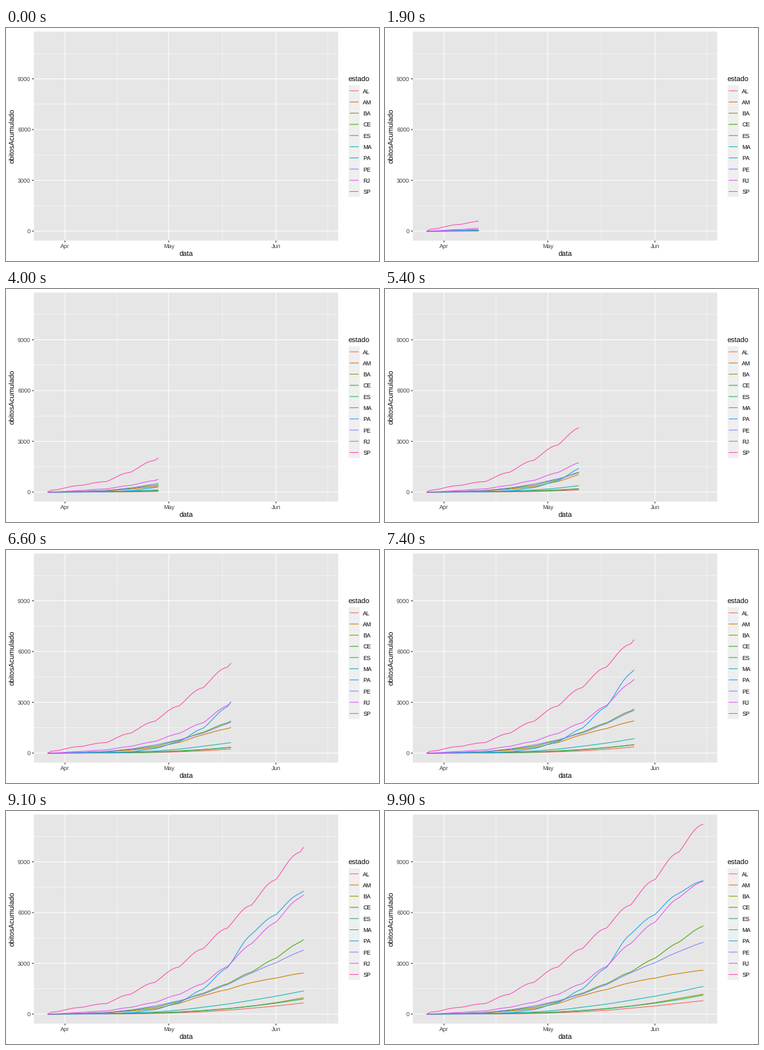
A matplotlib script that plays this animation: 576x360 px, repeating every 10000 ms.

```python
import matplotlib.pyplot as plt
import numpy as np
from matplotlib.animation import FuncAnimation
from matplotlib.patches import Rectangle

W, H, DPI = 576, 360, 72
FRAMES, INTERVAL = 100, 100
DAYS = 80                                  # 27 March to 15 June
LEFT, RIGHT, TOP, BOTTOM = 43.0, 513.0, 5.5, 328.5
Y_MAX = 11231

plt.rcParams.update({
    "font.family": "Liberation Sans",
    "text.hinting": "none",
    "text.hinting_factor": 1,
    "path.simplify": False,
})

# State: colour, weekend lag in days, totals on the key days
KEY_DAYS = [1, 17, 31, 45, 59, 73, 80]
STATES = {
    "AL": ("#f5645b", .1, [1, 4, 36, 140, 350, 640, 796]),
    "AM": ("#cf7a00", .5, [1, 74, 325, 1090, 1860, 2400, 2593]),
    "BA": ("#919300", .1, [1, 23, 78, 215, 480, 930, 1186]),
    "CE": ("#3fa70a", .6, [1, 94, 400, 1230, 2490, 4260, 5213]),
    "ES": ("#1fb56b", .1, [1, 18, 57, 200, 470, 860, 1121]),
    "MA": ("#17b3b7", .1, [1, 30, 125, 410, 820, 1330, 1637]),
    "PA": ("#1a9ff1", .8, [1, 17, 265, 1480, 4735, 7146, 7890]),
    "PE": ("#8a7cfd", .3, [2, 102, 480, 1190, 2440, 3700, 4245]),
    "RJ": ("#de54ef", .8, [6, 191, 688, 1798, 4171, 6890, 7853]),
    "SP": ("#fd4ab0", 1.1, [60, 625, 1880, 3872, 6456, 9585, Y_MAX]),
}


def totals(lag, keys):
    """Power-law growth between key days; counts run ahead until the weekend."""
    day = np.arange(1, DAYS + 1)
    week = (day - 3) % 7 / 7
    ahead = day + lag * np.sin(np.pi * week ** 1.4)
    growth = np.interp(np.log(ahead), np.log(KEY_DAYS), np.log(keys))
    return np.concatenate([[0], np.exp(growth)])


def px(day):
    return LEFT + (RIGHT - LEFT) * (day / DAYS + .05) / 1.1


def py(value):
    return BOTTOM - (BOTTOM - TOP) * (value / Y_MAX + .05) / 1.1


fig = plt.figure(figsize=(W / DPI, H / DPI), dpi=DPI, facecolor="white")
ax = fig.add_axes([0, 0, 1, 1])
ax.set_xlim(0, W)
ax.set_ylim(H, 0)
ax.axis("off")


def box(x, y, w, h, color):
    ax.add_patch(Rectangle((x, y), w, h, fc=color, ec="none", snap=False))


def stroke(xs, ys, color, width=1.07):
    line, = ax.plot(xs, ys, color=color, lw=width, snap=False,
                    solid_capstyle="butt", solid_joinstyle="round")
    return line


def label(x, y, text, size=8.8, color="black", ha="left", **kw):
    ax.text(x, y, text, fontsize=size, color=color, ha=ha, va="baseline", **kw)


# Panel, grid and axes
box(LEFT, TOP, RIGHT - LEFT, BOTTOM - TOP, "#e6e6e6")
for day in (20, 50.5, 81):
    stroke([px(day)] * 2, [TOP, BOTTOM], "white", .53)
for value in range(1500, 12000, 3000):
    stroke([LEFT, RIGHT], [py(value)] * 2, "white", .53)
for day, month in ((5, "Apr"), (35, "May"), (66, "Jun")):
    x = px(day)
    stroke([x, x], [TOP, BOTTOM], "white")
    stroke([x, x], [BOTTOM, BOTTOM + 2.75], "#242424")
    label(x, 340.4, month, color="#3b3b3b", ha="center")
for value in range(0, 12000, 3000):
    y = py(value)
    stroke([LEFT, RIGHT], [y, y], "white")
    stroke([LEFT - 2.75, LEFT], [y, y], "#242424")
    label(LEFT - 4.95, y + 3.2, str(value), color="#3b3b3b", ha="right")
label((LEFT + RIGHT) / 2, 353.1, "data", 11, ha="center")
label(13.6, (TOP + BOTTOM) / 2, "obitosAcumulado", 11, ha="center",
      rotation=90, rotation_mode="anchor")

# Legend and curves
KEY, KEY_X, KEY_Y = 17.28, 529.0, 88.4
label(KEY_X - .4, 82.5, "estado", 11)
box(KEY_X, KEY_Y, KEY, KEY * len(STATES), "#efefef")

curves = []
for i, (state, (color, lag, keys)) in enumerate(STATES.items()):
    y = KEY_Y + KEY * (i + .5)
    stroke([KEY_X + .1 * KEY, KEY_X + .9 * KEY], [y, y], color)
    label(KEY_X + KEY + 5, y + 3.5, state)
    curves.append((stroke([], [], color), py(totals(lag, keys))))

days_x = px(np.arange(DAYS + 1))


def update(frame):
    shown = round(frame * DAYS / (FRAMES - 1)) + 1
    for line, ys in curves:
        line.set_data(days_x[:shown], ys[:shown])
    return [line for line, _ in curves]


anim = FuncAnimation(fig, update, frames=FRAMES, interval=INTERVAL,
                     repeat=True, repeat_delay=0, blit=False)
plt.show()
```
